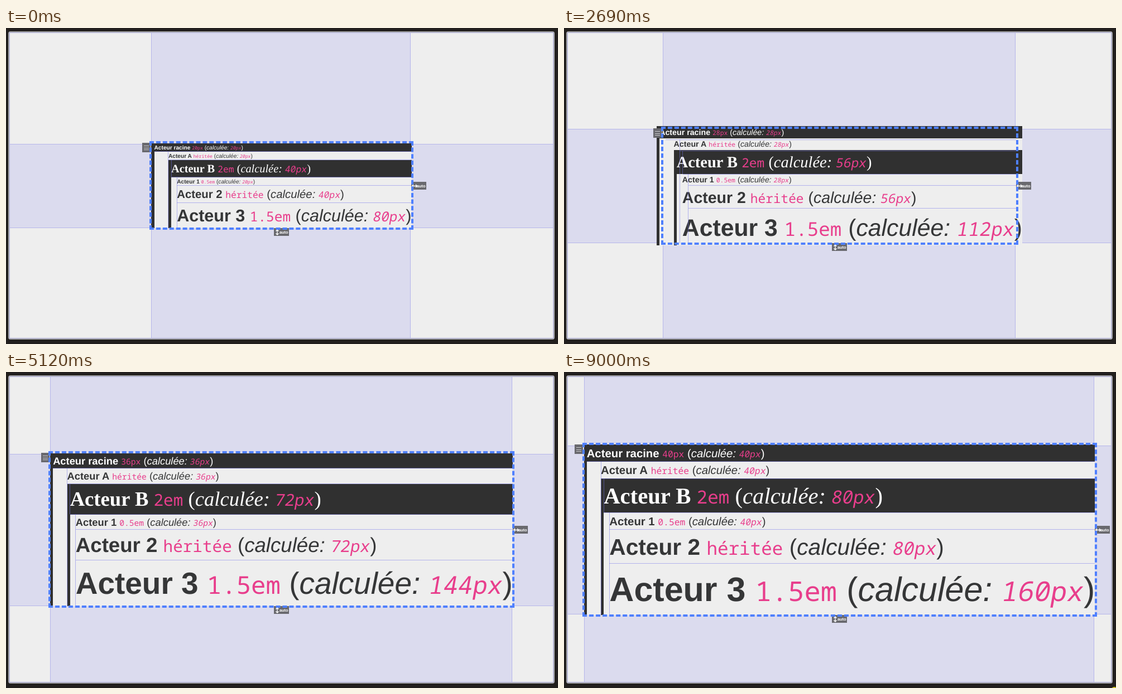
Write an HTML page that moves like this. It is 989 by 567 pixels and loops after 9.08 s.

```html
<!DOCTYPE html>
<html lang="fr">
<head>
<meta charset="utf-8">
<title>Tailles relatives</title>
<style>
  html, body { margin: 0; width: 100%; height: 100%; overflow: hidden; background: #221f1d; }
  svg { position: absolute; left: 0; top: 0; display: block; }
  text { text-rendering: geometricPrecision; white-space: pre; }
  rect, line { shape-rendering: crispEdges; }
  .sans { font-family: "Liberation Sans", Arial, sans-serif; }
  .serif { font-family: "Liberation Serif", "Times New Roman", serif; }
  .code { font-family: "Noto Sans Mono", "DejaVu Sans Mono", monospace; fill: #e83e8c; }
  .bold { font-weight: bold; }
  .italic { font-style: italic; }
  #outline { position: absolute; box-sizing: border-box; border: 4px dashed #4f80ff; }
</style>
</head>
<body>
<svg width="989" height="567" viewBox="0 0 989 567">
  <rect x="5" y="7" width="977" height="551" rx="3" fill="#eee" stroke="#a9a9ad" stroke-width="2" style="shape-rendering:auto"/>
  <g id="bands"></g>
  <rect x="6.5" y="8.5" width="974" height="548" fill="none" stroke="#b9b9e4"/>
  <g id="content"></g>
  <g id="guides"></g>
  <g id="labels"></g>
  <circle id="pointer" cx="986" cy="571" r="6" fill="#d8cc1c"/>
</svg>
<div id="outline"></div>
<script>
const LOOP = 9080, LAG = 65, ZOOM = 0.5085, CX = 493.5;
const CONTENT_CY = 283, OVERLAY_CY = 282.6;
const FIRST_SIZE = 20;
// Moments at which the root size grows by one pixel.
const GROWTH = [1280, 1400, 1610, 1740, 1940, 2150, 2470, 2690, 2960, 3350,
                3900, 4100, 4310, 4510, 4780, 5050, 5250, 5980, 6370, 6860];
const INDENT = { root: 10 * ZOOM, a: 60 * ZOOM, b: 70 * ZOOM, child: 90 * ZOOM };
const DARK = '#303030', INK = '#353637';
const byId = id => document.getElementById(id);

const sizeAt = t => FIRST_SIZE + GROWTH.filter(g => g <= t).length;

function layout(size, cy) {
  const unit = 1.5 * ZOOM * size;
  const chars = (size * 4 + 'px').length;
  // Width of the largest row in em: fixed words, then the computed value.
  const textWidth = (11.853 + chars * 0.48125) * 3 * ZOOM * size;
  const width = textWidth + INDENT.child;
  const left = CX - width / 2, top = cy - 5 * unit;
  return { left, right: left + width, top, bottom: top + 10 * unit, row: n => top + n * unit };
}

function box(x1, y1, x2, y2, attrs) {
  return `<rect x="${x1}" y="${y1}" width="${x2 - x1}" height="${y2 - y1}" ${attrs}/>`;
}

function stroke(x1, y1, x2, y2, color) {
  return `<line x1="${x1}" y1="${y1}" x2="${x2}" y2="${y2}" stroke="${color}"/>`;
}

function addText(parent, string, x, y, size, cls, fill, slant = 0) {
  const el = document.createElementNS('http://www.w3.org/2000/svg', 'text');
  el.setAttribute('class', cls);
  el.setAttribute('font-size', size);
  el.setAttribute('fill', fill);
  el.setAttribute('transform', `translate(${x} ${y}) skewX(${-slant})`);
  el.textContent = string;
  parent.appendChild(el);
  return x + el.getComputedTextLength();
}

function addRow(parent, x, top, size, name, rule, computed, ink, family = 'sans') {
  const serif = family === 'serif';
  const y = top + size * (serif ? 1.0875 : 1.0965);
  const space = size * (serif ? 0.25 : 0.278);
  const codeSize = size * 0.802, slantShift = size * 0.045;
  x = addText(parent, name, x, y, size, family + ' bold', ink) + space;
  x = addText(parent, rule, x, y, codeSize, 'code', ink) + space;
  x = addText(parent, '(', x, y, size, family, ink);
  x = addText(parent, 'calculée:', x, y, size, family + ' italic', ink) + space;
  x = addText(parent, computed + 'px', x - slantShift, y, codeSize, 'code', ink, 10) + slantShift;
  addText(parent, ')', x, y, size, family, ink);
}

function drawContent(size) {
  const { left, right, top, bottom, row } = layout(size, CONTENT_CY);
  const a = left + INDENT.a, b = left + INDENT.b, child = left + INDENT.child;
  const g = byId('content'), font = ZOOM * size;
  g.innerHTML =
    box(left, top, right, bottom, `fill="${DARK}"`) +
    box(left + INDENT.root, row(1), right, bottom, 'fill="#eee"') +
    box(a, row(2), right, bottom, `fill="${DARK}"`) +
    box(b, row(4), right, bottom, 'fill="#eee"');
  addRow(g, left + INDENT.root, top, font, 'Acteur racine', size + 'px', size, '#fff');
  addRow(g, a, row(1), font, 'Acteur A', 'héritée', size, INK);
  addRow(g, b, row(2), font * 2, 'Acteur B', '2em', size * 2, '#fff', 'serif');
  addRow(g, child, row(4), font, 'Acteur 1', '0.5em', size, INK);
  addRow(g, child, row(5), font * 2, 'Acteur 2', 'héritée', size * 2, INK);
  addRow(g, child, row(7), font * 3, 'Acteur 3', '1.5em', size * 4, INK);
}

function drawBands(l) {
  const x1 = Math.round(l.left) + 0.5, x2 = Math.round(l.right - 2.4) + 0.5;
  const y1 = Math.round(l.top + 1.6) + 0.5, y2 = Math.round(l.bottom - 1) + 0.5;
  const fill = 'fill="#dbdbee"', edge = 'fill="none" stroke="#b6b6ea"';
  byId('bands').innerHTML =
    box(x1, 8.5, x2, 556.5, fill) + box(6.5, y1, 980.5, y2, fill) +
    box(x1, 8.5, x2, 556.5, edge) + box(6.5, y1, 980.5, y2, edge);
}

function drawGuides(l) {
  const line = (x1, y1, x2, y2) => stroke(x1, y1, x2, y2, 'rgba(120,120,235,.5)');
  const a = l.left + INDENT.a, b = l.left + INDENT.b, child = l.left + INDENT.child;
  const across = (x, n) => line(x, l.row(n), l.right, l.row(n));
  byId('guides').innerHTML =
    across(l.left + INDENT.root, 1) + across(a, 2) + across(b, 4) +
    across(child, 5) + across(child, 7) +
    line(a, l.row(1), a, l.bottom) + line(b, l.row(2), b, l.row(4)) +
    line(child, l.row(4), child, l.bottom);
}

function drawAutoLabel(parent, x, y, vertical) {
  const turn = vertical ? `rotate(90 ${x + 6} ${y + 7.5})` : '';
  parent.insertAdjacentHTML('beforeend',
    box(x, y, x + 27, y + 14, 'fill="#69696e"') +
    `<path transform="${turn}" d="M${x + 2} ${y + 7.5}h8m-6 -2.5l-2.5 2.5l2.5 2.5m4 -5l2.5 2.5l-2.5 2.5"
      fill="none" stroke="#fff" stroke-width="1.3"/>`);
  addText(parent, 'auto', x + 10, y + 9.7, 7.4, 'sans bold', '#fff');
}

function drawLabels(l) {
  const g = byId('labels'), x = Math.round(l.left - 16.5), y = Math.round(l.top);
  g.innerHTML = box(x, y, x + 15, y + 17, 'fill="#69696e"') +
    [5.5, 9, 12.5].map(dy => stroke(x + 3, y + dy, x + 12, y + dy, '#c9c9cc')).join('');
  drawAutoLabel(g, Math.round(l.right - 0.3), 276, false);
  drawAutoLabel(g, 480, Math.round(l.bottom + 0.4), true);
}

function drawOverlay(size) {
  const l = layout(size, OVERLAY_CY);
  drawBands(l);
  drawGuides(l);
  drawLabels(l);
  Object.assign(byId('outline').style, {
    left: l.left - 3 + 'px', top: l.top - 3 + 'px',
    width: l.right - l.left + 6.5 + 'px', height: l.bottom - l.top + 6.4 + 'px'
  });
}

let contentSize, overlaySize;
function render(time) {
  const t = time % LOOP;
  const size = sizeAt(t), lagged = sizeAt(t - LAG);
  if (size !== contentSize) drawContent(contentSize = size);
  if (lagged !== overlaySize) drawOverlay(overlaySize = lagged);
  byId('pointer').setAttribute('visibility', t >= 9000 ? 'visible' : 'hidden');
}

const start = performance.now();
function tick() {
  render(performance.now() - start);
  requestAnimationFrame(tick);
}
tick();
</script>
</body>
</html>
```
